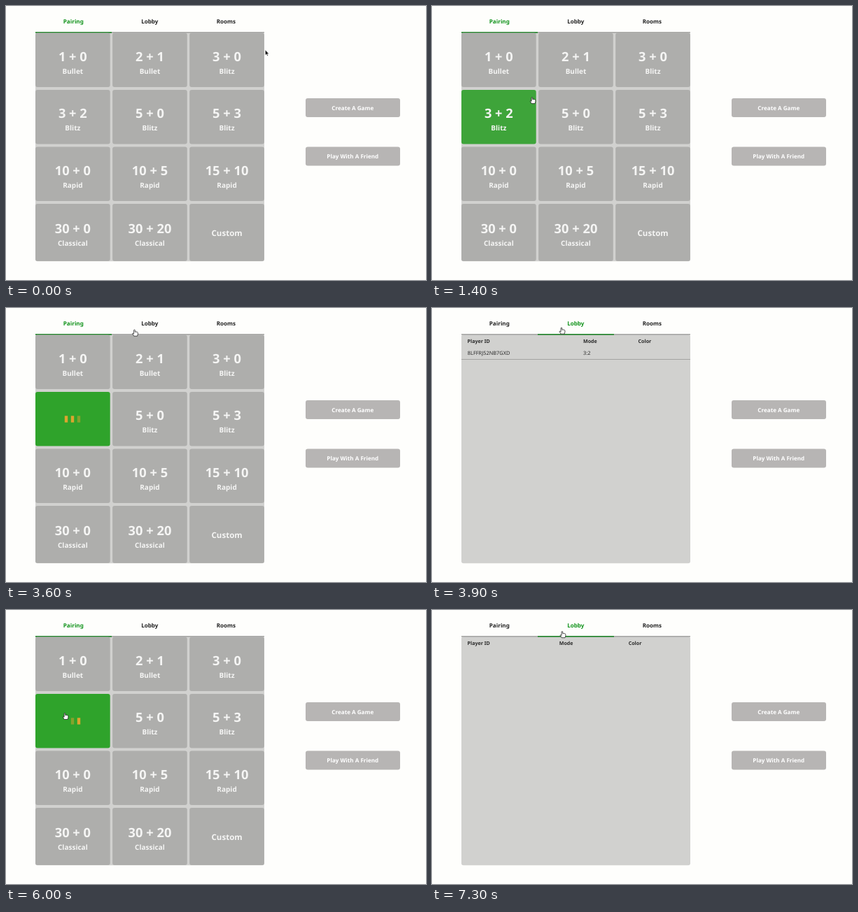
Animation, 600 px wide and 392 px high, one loop 7400 ms. Source, as an HTML page:

```html
<!DOCTYPE html>
<html lang="en">
<head>
<meta charset="utf-8">
<title>Game lobby</title>
<style>
html, body { margin: 0; width: 100%; height: 100%; overflow: hidden; background: #fefefc; }
svg { display: block; }
text { font: 700 8px "Noto Sans", "Open Sans", sans-serif; text-rendering: geometricPrecision; }
</style>
</head>
<body>
<svg id="stage" width="600" height="392" viewBox="0 0 600 392"></svg>
<script>
const LOOP = 7400, STEP = 100, FADE = 250, CHOSEN = 3;
const GREY = [174, 174, 172], GREEN = [47, 163, 43];
const INK = "#242424", LIGHT = "#f5f5f4", ACTIVE = "#11931b";
const stage = document.getElementById("stage");

function add(parent, tag, attrs = {}) {
  const node = document.createElementNS("http://www.w3.org/2000/svg", tag);
  for (const key in attrs) node.setAttribute(key, attrs[key]);
  return parent.appendChild(node);
}
const rect = (parent, x, y, width, height, fill, rx = 0) =>
  add(parent, "rect", { x, y, width, height, fill, rx });
function label(parent, str, x, y, size, fill, anchor = "middle", weight = 700) {
  const node = add(parent, "text", { x, y, fill, "text-anchor": anchor });
  node.style.fontSize = size + "px";
  node.style.fontWeight = weight;
  node.textContent = str;
  return node;
}
const show = (node, on) => node.setAttribute("visibility", on ? "inherit" : "hidden");

// Tabs and side buttons
const tabs = ["Pairing", "Lobby", "Rooms"].map((name, i) =>
  label(stage, name, 96.3 + 109 * i, 24.5, 8.1, INK));
rect(stage, 42, 38, 327, 327.3, "#d1d1cf", 3);
rect(stage, 42, 37, 327, 1.6, "#a6a6a4");
const underline = rect(stage, 42, 37, 109, 1.6, "#21862a");
["Create A Game", "Play With A Friend"].forEach((name, i) => {
  const y = 132 + 69.5 * i;
  rect(stage, 428, y, 135, 27, "#b7b5b4", 3);
  label(stage, name, 495.3, y + 16.5, 8.1, "#fff");
});

// Pairing grid
const pairing = add(stage, "g");
const cells = [
  "1 + 0 Bullet", "2 + 1 Bullet", "3 + 0 Blitz",
  "3 + 2 Blitz", "5 + 0 Blitz", "5 + 3 Blitz",
  "10 + 0 Rapid", "10 + 5 Rapid", "15 + 10 Rapid",
  "30 + 0 Classical", "30 + 20 Classical", "Custom"
].map((name, i) => {
  const row = Math.floor(i / 3), x = 42 + 110.1 * (i % 3), y = 38.5 + 81.5 * row;
  const w = 106.7, h = row === 3 ? 82 : 77.6;
  const mid = x + w / 2, base = y + h / 2 + 1.2;
  const box = rect(pairing, x, y, w, h, "#aeaeac", 3);
  const words = add(pairing, "g");
  const cut = name.lastIndexOf(" ");
  if (cut < 0) {
    label(words, name, mid, base + 3.4, 11.5, LIGHT);
  } else {
    label(words, name.slice(0, cut), mid, base, 18.3, LIGHT);
    label(words, name.slice(cut + 1), mid, base + 18, 10, LIGHT);
  }
  const holds = (px, py) => px > x && px < x + w && py > y && py < y + h;
  return { box, words, holds };
});
const bars = [0, 1, 2].map(i => rect(pairing, 83.8 + 9 * i, 154.3, 4.4, 9.4, "#dca52e"));

// Lobby table
const lobby = add(stage, "g");
const cellText = (parent, str, x, y, size = 7.1, weight = 700) =>
  label(parent, str, x, y, size, "#2b2b2b", "start", weight);
cellText(lobby, "Player ID", 50.6, 49.6);
const mode = cellText(lobby, "Mode", 216, 49.6);
const color = cellText(lobby, "Color", 294.6, 49.6);
const entry = add(lobby, "g");
cellText(entry, "8LFFRJ52NB7GXD", 50.8, 67.2, 7.4, 400);
cellText(entry, "3:2", 216, 67.2, 7.4, 400);
rect(entry, 42, 73, 327, 1, "#a3a3a1");

// Pointers, both with the hot spot at 0,0
const arrow = add(stage, "path", {
  d: "M0 0V7.6L1.7 6L3 8.8L4.1 8.3L3 5.6H5.3Z",
  fill: "#111", stroke: "#fff", "stroke-width": .5
});
const hand = add(stage, "path", {
  d: "M-.9 .6Q0-.6 .8 .6V3.2Q4.9 2.6 4.9 4.7V6.6L4 9.2H-.8L-2.9 5.7Q-3 4.4-.9 5.9Z",
  fill: "#fff", stroke: "#222", "stroke-width": .8, "stroke-linejoin": "round"
});

// Pointer moves: start, end, x, y reached
const moves = [
  [800, 1230, 143, 130.4], [1400, 1500, 132, 135.5], [2700, 3700, 185, 28],
  [4600, 5000, 118, 26.5], [5300, 6000, 84, 147.3], [6200, 6800, 186, 30.5]
];

const clamp = v => Math.max(0, Math.min(1, v));
const ease = k => k * k * (3 - 2 * k);
const mix = (a, b, k) => a + (b - a) * k;
const isBusy = t => t >= 2300 && t < 6200;

function pointerAt(t) {
  let x = 370.3, y = 62.8;
  for (const [from, to, toX, toY] of moves) {
    const k = ease(clamp((t - from) / (to - from)));
    x = mix(x, toX, k);
    y = mix(y, toY, k);
  }
  return [x, y];
}

// Index of the clickable cell under the pointer, or -1
function hoveredAt(t) {
  const i = cells.findIndex(cell => cell.holds(...pointerAt(t)));
  return isBusy(t) && i !== CHOSEN ? -1 : i;
}

// Share of the fade time that the pointer has spent on the hovered cell
function hoverGlow(i, t) {
  let hits = 0;
  for (let back = 0; back < FADE; back += 10) hits += hoveredAt(t - back) === i;
  return hits * 10 / FADE;
}

function barOpacity(age) {
  const v = Math.max(0, age) % 800;
  return Math.min(clamp((v - 200) / 200), clamp((800 - v) / 200));
}

function draw(t) {
  const busy = isBusy(t), hovered = hoveredAt(t);
  const firstVisit = t >= 3900 && t < 5200, inLobby = firstVisit || t >= 6900;

  show(pairing, !inLobby);
  show(lobby, inLobby);
  show(entry, firstVisit);
  mode.setAttribute("x", firstVisit ? 216 : 181.7);
  color.setAttribute("x", firstVisit ? 294.6 : 280.7);
  underline.setAttribute("x", inLobby ? 151 : 42);
  tabs.forEach((tab, i) => tab.setAttribute("fill", i === +inLobby ? ACTIVE : INK));

  cells.forEach(({ box, words }, i) => {
    const chosen = busy && i === CHOSEN;
    const glow = chosen ? 1 : i === hovered ? hoverGlow(i, t) : 0;
    box.setAttribute("fill", `rgb(${GREY.map((c, n) => Math.round(mix(c, GREEN[n], glow)))})`);
    show(words, !chosen);
  });
  const age = t - (t < 5200 ? 2300 : 5200);
  bars.forEach((bar, i) => bar.setAttribute("opacity", busy ? barOpacity(age - 100 * i) : 0));

  const [x, y] = pointerAt(t);
  const clickable = y < 38 || hovered >= 0;
  show(arrow, !clickable);
  show(hand, clickable);
  for (const p of [arrow, hand]) p.setAttribute("transform", `translate(${x} ${y})`);
}

function tick() {
  draw(Math.floor(performance.now() % LOOP / STEP) * STEP);
  requestAnimationFrame(tick);
}
tick();
</script>
</body>
</html>
```
